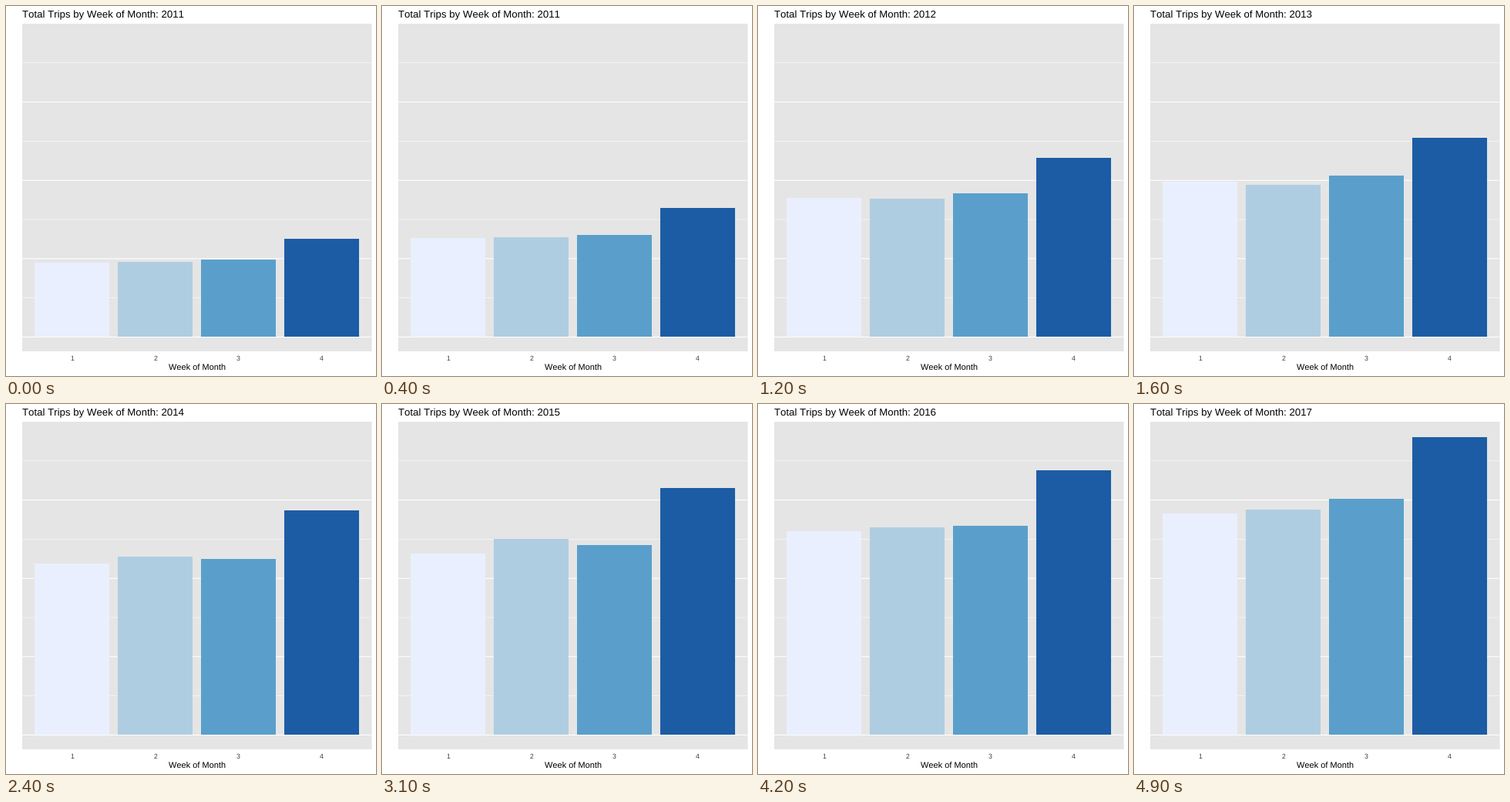
Recreate the animation shown at these times as a matplotlib script. Size 480x480 px, loop 5 s.

```python
import matplotlib.pyplot as plt
import numpy as np
from matplotlib.animation import FuncAnimation
from matplotlib.patches import Rectangle

plt.rcParams.update({
    "font.family": "Liberation Sans",
    "text.hinting": "none",
    "text.kerning_factor": 6,
    "toolbar": "None",
})

SIZE, DPI = 480, 80
FRAMES, INTERVAL = 50, 100
FIRST_YEAR, LAST_YEAR = 2011, 2017
PX = 72 / DPI

PANEL = (21, 23, 474.5, 448)
BASE, MAJOR_STEP = 429.4, 101.6
BAR_LEFT, BAR_WIDTH, BAR_PITCH = 37, 97, 108
COLORS = ["#E9EFFE", "#AFCDE1", "#5A9FCB", "#1C5CA5"]

# Bar tops in pixels, one row per week, one column per year
TOPS = np.array([
    [333, 269, 228, 207, 190.3, 168.3, 142],
    [332, 267, 232, 198, 168.4, 163.3, 137],
    [329, 265, 220, 201, 177.9, 163.0, 123],
    [302, 222, 171, 138, 100.7, 92.1, 43],
])
YEARS = np.arange(FIRST_YEAR, LAST_YEAR + 1)
KEYS = np.round((FRAMES - 1) * (YEARS - FIRST_YEAR) / (LAST_YEAR - FIRST_YEAR))

fig = plt.figure(figsize=(SIZE / DPI, SIZE / DPI), dpi=DPI, facecolor="white")
ax = fig.add_axes([0, 0, 1, 1])
ax.set(xlim=(0, SIZE), ylim=(SIZE, 0))
ax.axis("off")


def box(x0, y0, x1, y1, color, z, snap=None):
    patch = Rectangle((x0, y0), x1 - x0, y1 - y0, facecolor=color,
                      linewidth=0, zorder=z, snap=snap)
    return ax.add_patch(patch)


def label(x, y, text, size, color="black", align="center"):
    return ax.text(x, y, text, fontsize=size * PX, color=color,
                   ha=align, va="baseline", zorder=4)


left, top, right, bottom = PANEL
box(left, top, right, bottom, "#E5E5E5", 0, snap=False)
for half in range(8):
    y = BASE - half * MAJOR_STEP / 2
    width = 0.54 if half % 2 else 1.07
    box(left, y - width / 2, right, y + width / 2, "white", 1, snap=False)

bars = []
for week, color in enumerate(COLORS):
    x = BAR_LEFT + week * BAR_PITCH
    bars.append(box(x, BASE, x + BAR_WIDTH, BASE, color, 2))
    label(x + BAR_WIDTH / 2, 460, str(week + 1), 8.8, "#404040")

label(248, 473, "Week of Month", 11)
title = label(21, 15, "", 13.2, align="left")


def update(frame):
    year = FIRST_YEAR + (LAST_YEAR - FIRST_YEAR) * frame / (FRAMES - 1)
    title.set_text(f"Total Trips by Week of Month: {round(year)}")
    for bar, tops in zip(bars, TOPS):
        y = np.interp(frame, KEYS, tops)
        bar.set_y(y)
        bar.set_height(BASE - y)
    return [title, *bars]


anim = FuncAnimation(fig, update, frames=FRAMES, interval=INTERVAL,
                     repeat=True, repeat_delay=0, blit=False)
plt.show()
```
